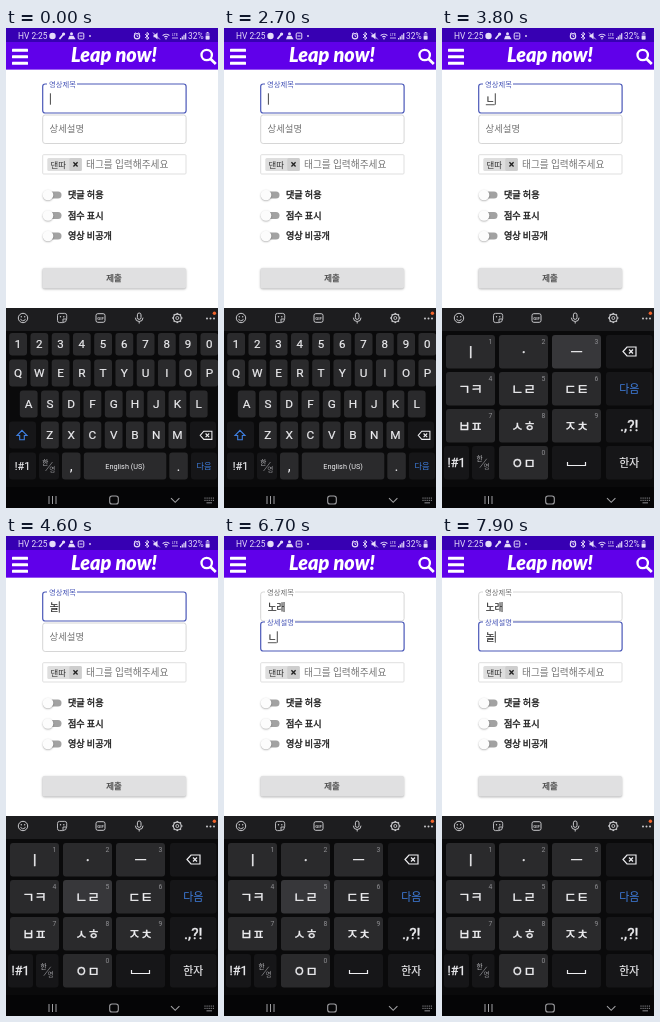
Recreate the animation shown at these times as an HTML page with a canvas. Size 212 px wide and 480 px high, loop 8 s.

```html
<!DOCTYPE html>
<html lang="ko">
<head>
<meta charset="utf-8">
<title>Upload form</title>
<style>
html, body { margin: 0; width: 100%; height: 100%; overflow: hidden; background: #fff; }
canvas { display: block; width: 212px; height: 480px; }
</style>
</head>
<body>
<canvas id="stage"></canvas>
<script>
const W = 212, H = 480, LOOP = 8000;
const canvas = document.getElementById('stage');
const ctx = canvas.getContext('2d');
const dpr = window.devicePixelRatio || 1;
canvas.width = W * dpr;
canvas.height = H * dpr;

const KR = '"Noto Sans CJK KR", "Noto Sans CJK JP", "Noto Sans CJK", sans-serif';
const LATIN = 'Roboto, "Noto Sans CJK KR", sans-serif';
const BLUE = '#4a58b8', KEY = '#2a2a2c', SIDE = '#161618', LIT = '#37373a', INK = '#ededf0', LINK = '#3f7fe0';

// [start ms, text, underlined characters]
const titleSteps = [[0, '', 0], [3300, 'ㄴ', 1], [3900, '노', 1], [4200, '논', 1], [4300, '놀', 1],
  [4400, '놀', 0], [4800, '노리', 1], [5000, '노라', 1], [5300, '노래', 1], [6300, '노래', 0]];
const detailSteps = [[0, '', 0], [6700, 'ㄴ', 1], [7300, 'ㄴㆍ', 2], [7400, '노', 1],
  [7500, '논', 1], [7600, '놀', 1], [7900, '놀', 0]];
// [column, row, from, to]
const presses = [[1, 1, 3200, 3300], [1, 1, 3400, 3500], [1, 0, 3600, 3700], [2, 0, 3800, 3900],
  [1, 1, 4100, 4200], [1, 1, 4600, 4700], [1, 1, 6700, 6800], [1, 1, 6900, 7000], [1, 1, 7500, 7600]];

const at = (steps, t) => steps.filter(s => s[0] <= t).pop();

// o.heft thickens the glyphs for a weight between regular and bold.
function text(s, x, y, size, color, o = {}) {
  ctx.font = `${o.weight || 400} ${size}px ${o.font || KR}`;
  ctx.textAlign = o.align || 'left';
  ctx.textBaseline = 'alphabetic';
  ctx.fillStyle = color;
  ctx.fillText(s, x, y);
  if (o.heft) {
    ctx.strokeStyle = color;
    ctx.lineWidth = o.heft;
    ctx.strokeText(s, x, y);
  }
}
const center = (s, x, y, size, color, o) => text(s, x, y + size * 0.36, size, color, { align: 'center', ...o });

function rect(x, y, w, h, color) {
  ctx.fillStyle = color;
  ctx.fillRect(x, y, w, h);
}
function roundPath(x, y, w, h, r) {
  ctx.beginPath();
  ctx.roundRect(x, y, w, h, r);
}
function box(x, y, w, h, r, color) {
  roundPath(x, y, w, h, r);
  ctx.fillStyle = color;
  ctx.fill();
}
function frame(x, y, w, h, r, color, lw = 1) {
  roundPath(x, y, w, h, r);
  ctx.strokeStyle = color;
  ctx.lineWidth = lw;
  ctx.stroke();
}
function dot(x, y, r, color) {
  ctx.beginPath();
  ctx.arc(x, y, r, 0, 7);
  ctx.fillStyle = color;
  ctx.fill();
}
function ring(x, y, r, color, lw = 1) {
  ctx.beginPath();
  ctx.arc(x, y, r, 0, 7);
  ctx.strokeStyle = color;
  ctx.lineWidth = lw;
  ctx.stroke();
}
function line(color, lw, ...p) {
  ctx.beginPath();
  for (let i = 0; i < p.length; i += 2) ctx.lineTo(p[i], p[i + 1]);
  ctx.strokeStyle = color;
  ctx.lineWidth = lw;
  ctx.stroke();
}
function poly(color, ...p) {
  ctx.beginPath();
  for (let i = 0; i < p.length; i += 2) ctx.lineTo(p[i], p[i + 1]);
  ctx.fillStyle = color;
  ctx.fill();
}
function shadow(blur, dy, alpha, draw) {
  ctx.save();
  ctx.shadowColor = `rgba(0,0,0,${alpha})`;
  ctx.shadowBlur = blur * dpr;
  ctx.shadowOffsetY = dy * dpr;
  draw();
  ctx.restore();
}

function statusBar() {
  const c = '#e6dcfa';
  rect(0, 0, W, 14, '#3700b3');
  text('HV 2:25', 12, 11.4, 8.4, c, { font: LATIN });
  dot(46.5, 8, 3.2, c);
  line(c, 1.8, 53.5, 11, 58, 5.5);
  dot(57.6, 6, 1.6, c);
  dot(65.5, 5.7, 1.5, c);
  poly(c, 62, 11.3, 63.5, 7.8, 67.5, 7.8, 69.5, 11.3);
  frame(72.2, 5, 5.6, 6, 1, c);
  line(c, 1, 73.5, 8, 76.5, 8);
  dot(84, 8, 0.9, c);

  ring(131, 8.2, 2.7, c, 1.1);
  line(c, 0.9, 131, 6.6, 131, 8.4, 132.2, 8.4);
  line(c, 0.9, 128.2, 5.8, 129.6, 4.6);
  line(c, 0.9, 133.8, 5.8, 132.4, 4.6);
  line(c, 0.9, 139, 6, 143, 10, 141, 11.6, 141, 4.4, 143, 6, 139, 10);
  poly(c, 147.5, 6.7, 149, 6.7, 151.5, 4.5, 151.5, 11.5, 149, 9.3, 147.5, 9.3);
  line(c, 0.9, 147, 4.6, 153.8, 11.4);
  for (const r of [2.3, 4.6]) {
    ctx.beginPath();
    ctx.arc(160, 10.8, r, -2.4, -0.74);
    ctx.strokeStyle = c;
    ctx.lineWidth = 1.1;
    ctx.stroke();
  }
  dot(160, 10.7, 0.8, c);
  center('LTE', 169, 6.3, 4, c, { font: LATIN });
  line(c, 0.8, 166, 10, 172, 10);
  for (let i = 0; i < 4; i++) rect(174 + i * 1.7, 10 - i * 1.6, 1.2, 1.5 + i * 1.6, c);
  text('32%', 182, 11.4, 8.4, c, { font: LATIN });
  box(199.7, 4.8, 3.8, 6.7, 0.8, '#8b6cd8');
  rect(200.7, 4, 1.8, 1, c);
  box(199.7, 8, 3.8, 3.5, 0.6, c);
}

function header() {
  rect(0, 14, W, 27.5, '#6000ea');
  for (const y of [20.7, 27.2, 33.7]) box(6, y, 16, 3, 0.5, '#fff');
  center('Leap now!', 108, 26.8, 19.8, '#fff', { font: 'Lato, sans-serif', weight: 'italic 900' });
  ring(200.7, 27, 5.2, '#fff', 2.3);
  line('#fff', 2.8, 204.4, 30.7, 209.8, 36);
}

// Outlined text field; lift runs from 0 (label inside) to 1 (label on the border).
function field(y, h, label, lift, focus, step, caret) {
  frame(36.7, y, 143.4, h, 2.5, focus ? BLUE : '#d2d2d2', focus ? 1.2 : 0.9);
  if (lift > 0) rect(41, y - 1.5, 30 * lift, 3, '#fff');
  const size = 9.4 - 2.1 * lift;
  const labelY = y + 13.5 * (1 - lift);
  text(label, 43.5 - 0.5 * lift, labelY + size * 0.36, size, focus ? BLUE : '#737373');
  const [, str, marked] = step;
  text(str, 43.7, y + 18.6, 9.7, '#222', { heft: 0.15 });
  const end = 43.9 + ctx.measureText(str).width;
  if (marked) rect(end - 9 * marked, y + 20.3, 8.9 * marked, 0.9, '#444');
  if (focus && caret) rect(end, y + 9.3, 0.9, 11.4, '#333');
}

function form(t, caret) {
  rect(0, 41.5, W, 239, '#fff');
  const second = t >= 6300;
  const p = Math.min(1, Math.max(0, (t - 6250) / 200));
  const lift = 1 - (1 - p) ** 3;
  field(56, 29, '영상제목', 1, !second, at(titleSteps, t), caret);
  field(87 - lift, 28.5 + 0.5 * lift, '상세설명', lift, second, at(detailSteps, t), caret && t >= 6400);

  frame(36.7, 126.7, 143.3, 19.3, 1, '#dcdcdc', 0.9);
  box(41.3, 130, 34.5, 13, 1.5, '#dedede');
  box(63.3, 130, 12.5, 13, 1.5, '#cecece');
  text('댄따', 44.5, 139.5, 8.4, '#333');
  line('#222', 1.3, 67.4, 134.3, 71.6, 138.5);
  line('#222', 1.3, 71.6, 134.3, 67.4, 138.5);
  text('태그를 입력해주세요', 80, 140, 9.7, '#757575');

  ['댓글 허용', '점수 표시', '영상 비공개'].forEach((s, i) => {
    const y = 167 + i * 20.5;
    box(39, y - 3.5, 16.5, 7, 3.5, '#a2a2a2');
    shadow(1.8, 0.7, 0.32, () => dot(42, y, 5.3, '#fcfcfc'));
    text(s, 62, y + 3.4, 9.1, '#1a1a1a', { heft: 0.35 });
  });

  shadow(2.2, 0.8, 0.32, () => box(36.5, 240, 143.5, 20.5, 2, '#e0e0e1'));
  center('제출', 108, 250, 8.4, '#484848', { heft: 0.25 });
}

function toolbar() {
  const c = '#c9c9cc', y = 290;
  rect(0, 280, W, 23, '#1d1d1f');
  ring(17, y, 4.7, c);
  dot(15.3, y - 1.3, 0.7, c);
  dot(18.7, y - 1.3, 0.7, c);
  ctx.beginPath();
  ctx.arc(17, y + 0.4, 2.4, 0.2, 2.94);
  ctx.strokeStyle = c;
  ctx.lineWidth = 0.9;
  ctx.stroke();
  roundPath(51.5, y - 4.6, 9.2, 9.2, [2, 2, 4, 2]);
  ctx.stroke();
  line(c, 0.9, 60.5, y + 1, 57, y + 1, 57, y + 4.5);
  dot(54.5, y - 1.2, 0.7, c);
  dot(57.8, y - 1.2, 0.7, c);
  frame(90, y - 4.3, 9, 8.6, 1.8, c);
  center('GIF', 94.5, y, 4.4, c, { font: LATIN, weight: 700 });
  frame(131.4, y - 5, 3.6, 6.4, 1.8, c);
  ctx.beginPath();
  ctx.arc(133.2, y - 0.3, 3.8, 0, Math.PI);
  ctx.stroke();
  line(c, 1, 133.2, y + 3.5, 133.2, y + 5.5);
  ring(171.3, y, 3.9, c, 1.1);
  ring(171.3, y, 1.5, c, 0.9);
  for (let i = 0; i < 8; i++) {
    const a = i * Math.PI / 4, x = Math.cos(a), v = Math.sin(a);
    line(c, 1.5, 171.3 + x * 3.9, y + v * 3.9, 171.3 + x * 5.1, y + v * 5.1);
  }
  for (const x of [201, 204.5, 208]) dot(x, y + 0.5, 1, c);
  dot(208.4, y - 4.7, 1.7, '#f0642d');
}

function key(x, y, w, h, label, size, o = {}) {
  box(x, y, w, h, 3, o.fill || KEY);
  if (label) center(label, x + w / 2, y + h / 2, size, o.color || INK, { font: LATIN, ...o });
}
function langKey(x, y, w, h) {
  key(x, y, w, h, '', 0, { fill: SIDE });
  const cx = x + w / 2, cy = y + h / 2;
  center('한', cx - 3.6, cy - 3.8, 6.6, '#c4c4c8');
  center('영', cx + 3.2, cy + 4, 6.6, '#98989c');
  line('#909094', 0.7, cx - 3.5, cy + 5, cx + 3.5, cy - 4);
}
function backspace(x, y) {
  ctx.beginPath();
  for (const [a, b] of [[-7, 0], [-3, -4.5], [6, -4.5], [6, 4.5], [-3, 4.5]]) ctx.lineTo(x + a, y + b);
  ctx.closePath();
  ctx.strokeStyle = INK;
  ctx.lineWidth = 1.2;
  ctx.stroke();
  line(INK, 1.2, x - 1, y - 2, x + 3, y + 2);
  line(INK, 1.2, x + 3, y - 2, x - 1, y + 2);
}

function english() {
  const row = (s, x, y, h, size) =>
    [...s].forEach((c, i) => key(x + i * 21.25, y, 17.8, h, c, size, { heft: 0.2 }));
  row('1234567890', 3.2, 305, 22.5, 11.5);
  row('QWERTYUIOP', 3.2, 331.5, 27, 11.8);
  row('ASDFGHJKL', 13.8, 362.5, 27, 11.8);
  row('ZXCVBNM', 35, 393.5, 27, 11.8);
  key(3, 393.5, 27, 27, '', 0, { fill: SIDE });
  ctx.beginPath();
  for (const [a, b] of [[0, -5.2], [5, 0], [2.3, 0], [2.3, 4.2], [-2.3, 4.2], [-2.3, 0], [-5, 0]])
    ctx.lineTo(16 + a, 407.5 + b);
  ctx.closePath();
  ctx.strokeStyle = LINK;
  ctx.lineWidth = 1.1;
  ctx.stroke();
  key(184, 393.5, 26, 27, '', 0, { fill: SIDE });
  ctx.save();
  ctx.translate(200.5, 407.3);
  ctx.scale(0.9, 0.9);
  backspace(0, 0);
  ctx.restore();
  key(3, 424.5, 27, 27, '!#1', 10.8, { fill: SIDE, heft: 0.15 });
  langKey(33, 424.5, 20, 27);
  key(56, 424.5, 18.5, 27, ',', 15);
  key(77.8, 424.5, 82.5, 27, 'English (US)', 7.3);
  key(163.3, 424.5, 18.5, 27, '.', 15);
  key(185, 424.5, 26, 27, '다음', 8.2, { fill: SIDE, color: LINK, font: KR });
}

function korean(t) {
  const cols = [4, 57, 110], rows = [307, 344, 381, 418], kh = 33.5;
  const jamo = { font: KR, heft: 0.4 };
  const labels = ['ㅣ', 'ㆍ', 'ㅡ', 'ㄱㅋ', 'ㄴㄹ', 'ㄷㅌ', 'ㅂㅍ', 'ㅅㅎ', 'ㅈㅊ'];
  const digit = (d, x, y) => center(d, x + 44.5, y + 6.2, 6.8, '#8e8e92', { font: LATIN });
  const side = (r, s, size, o) => key(164, rows[r], 46.5, kh, s, size, { fill: SIDE, ...o });
  labels.forEach((s, i) => {
    const c = i % 3, r = Math.floor(i / 3);
    const lit = presses.some(p => p[0] === c && p[1] === r && t >= p[2] && t < p[3]);
    key(cols[c], rows[r], 49, kh, s, 13.3, { ...jamo, fill: lit ? LIT : KEY });
    digit(String(i + 1), cols[c], rows[r]);
  });
  side(0);
  backspace(188, 323.5);
  side(1, '다음', 11, { color: LINK, font: KR });
  side(2, '.,?!', 15.5, { heft: 0.4 });
  side(3, '한자', 10.8, { font: KR, heft: 0.2 });
  key(2, 418, 25, kh, '!#1', 12.5, { fill: SIDE, heft: 0.3 });
  langKey(30, 418, 22.5, kh);
  key(57, 418, 49, kh, 'ㅇㅁ', 13.3, jamo);
  digit('0', 57, 418);
  key(110, 418, 49, kh, '', 0, { fill: SIDE });
  line(INK, 1.2, 125.5, 434, 125.5, 437.5, 143.5, 437.5, 143.5, 434);
}

function navBar() {
  const c = '#a0a0a3', dim = '#77777a';
  rect(0, 459, W, 21, '#050506');
  for (const x of [43, 46.5, 50]) line(c, 1, x, 468, x, 476);
  frame(103.7, 468, 8.6, 8, 2.3, c, 1.1);
  line(c, 1.1, 165, 470.2, 169.2, 474.3, 173.4, 470.2);
  for (let i = 0; i < 5; i++) {
    rect(198.4 + i * 2.1, 469.5, 1.2, 1.2, dim);
    rect(198.4 + i * 2.1, 471.8, 1.2, 1.2, dim);
  }
  rect(200.5, 474.2, 5.5, 1.2, dim);
}

function caretOn(t) {
  const p = t % 1000;
  if (t < 3000) return p < 100 || p >= 500;
  return !(t >= 5500 && t < 6000);
}

function draw(now) {
  const t = now % LOOP;
  ctx.setTransform(dpr, 0, 0, dpr, 0, 0);
  form(t, caretOn(t));
  statusBar();
  header();
  rect(0, 280, W, 200, '#0a0a0b');
  toolbar();
  if (t < 2800) english();
  else korean(t);
  navBar();
}

let start;
function tick(now) {
  if (start === undefined) start = now;
  draw(now - start);
  requestAnimationFrame(tick);
}
draw(0);
requestAnimationFrame(tick);
</script>
</body>
</html>
```
